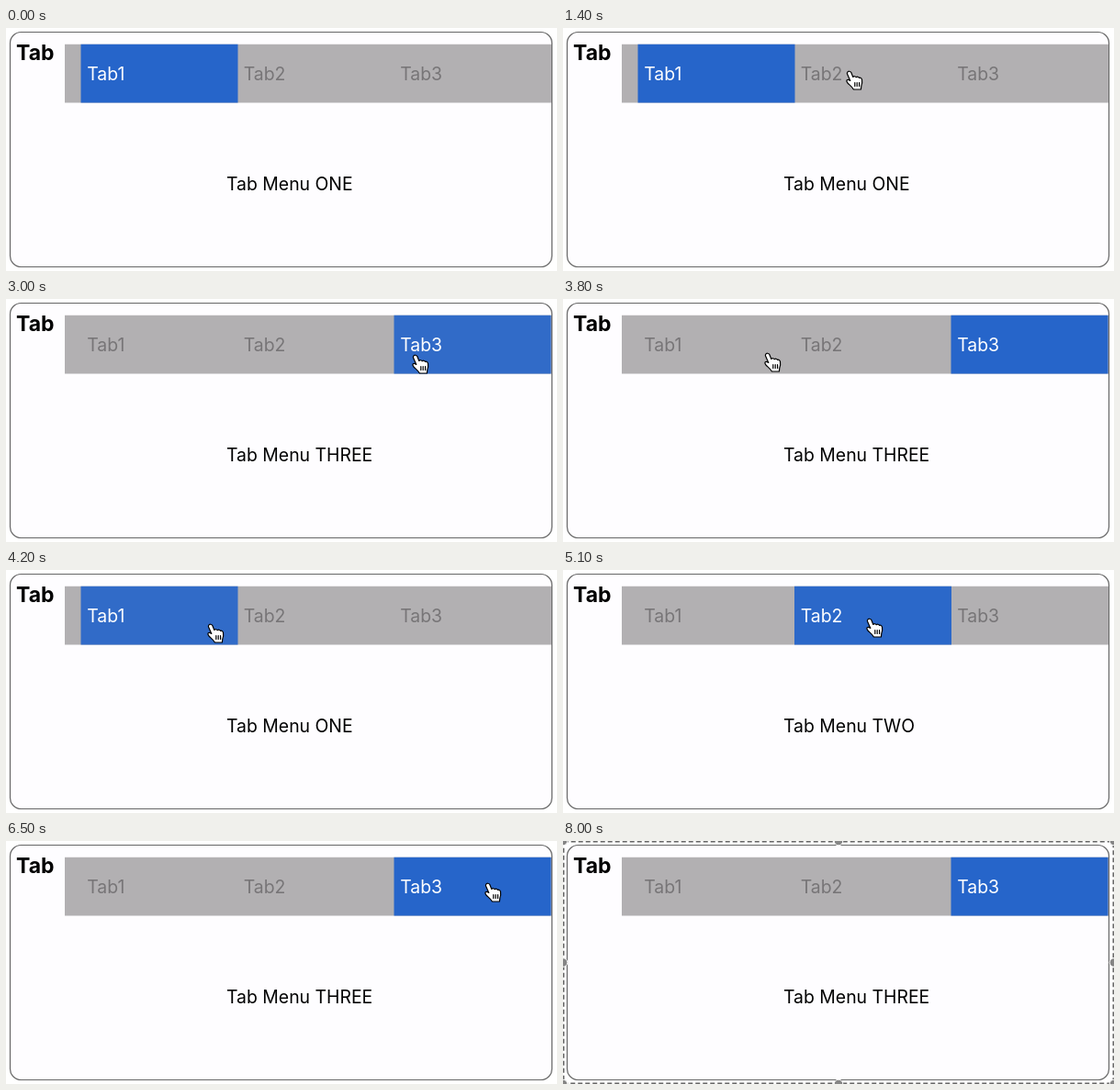
Write an HTML page that moves like this. It is 600 px wide and 265 px high and loops after 9900 ms.

```html
<!DOCTYPE html>
<html lang="en">
<head>
<meta charset="utf-8">
<title>Tab menu</title>
<style>
  html, body { margin: 0; width: 100%; height: 100%; overflow: hidden; background: #fff; }
  svg { display: block; width: 100%; height: 100%; }
  text { font: 19.4px Inter, "Open Sans", sans-serif; }
  .title { font-size: 23px; font-weight: 700; }
  .frame { fill: #fefdff; stroke: #666; stroke-width: 1.2; }
  .dashes { fill: none; stroke: #666; stroke-width: 1.5; stroke-dasharray: 5 3; }
  .handles { fill: #858585; stroke: #fff; }
  #hand { fill: #fff; stroke: #000; stroke-width: 1.2; stroke-linejoin: round; stroke-linecap: round; }
  #arrow { fill: #000; stroke: #fff; stroke-width: 1.2; stroke-linejoin: round; }
</style>
</head>
<body>
<svg viewBox="0 0 600 265">
  <clipPath id="bar"><rect x="64" y="17.7" width="530" height="63.8"/></clipPath>
  <rect class="frame" x="4.5" y="4.5" width="590" height="256" rx="12"/>
  <text class="title" x="11" y="34.5">Tab</text>
  <g clip-path="url(#bar)">
    <rect x="60" y="10" width="540" height="80" fill="#b2b0b2"/>
    <rect id="highlight" y="10" width="171" height="80"/>
  </g>
  <g id="labels"></g>
  <text id="content" x="240" y="177"></text>
  <g id="cursor">
    <g id="hand">
      <path d="M1.6 2.4C2.4.8 5 .8 5.8 2.6L7.8 7.4C8.6 6.4 10.6 6.5 11.2 7.7C12.2 6.8 13.9 7.1 14.4 8.4C15.6 7.8 17.2 8.6 17.5 10.2C18 13.4 17.8 15.2 16.8 17.2L16.4 21H8.4C7.4 18.8 5 16.8 3.2 15.2C1 13.2.4 11.6 1.3 10.7C2.3 9.8 3.6 10.6 4.8 11.4L1.7 4.6C1.3 3.7 1.3 3 1.6 2.4Z"/>
      <path d="M9.8 13.5v4M12.2 13.5v4M14.6 13.5v4"/>
    </g>
    <path id="arrow" d="M1 1V17.5L4.8 14L7.4 20.5L10.2 19.3L7.7 13H13Z"/>
  </g>
  <g id="selection">
    <rect class="dashes" x=".75" y=".75" width="598.5" height="263.5"/>
    <g class="handles"></g>
  </g>
</svg>
<script>
  const LOOP = 9900, STEP = 100, FADE = 530, TRAVEL = 350, CLICK_DELAY = 150;
  const POINTER_IN = 200, SELECT = 8000;
  const GRAY = [178, 176, 178], BLUE = [38, 101, 202];
  const WORDS = ['ONE', 'TWO', 'THREE'];

  // Where the pointer rests; a stop with a tab ends in a click.
  const stops = [
    { arrive: POINTER_IN, x: 446, y: 225 },
    { arrive: 300, x: 450, y: 220 },
    { arrive: 1100, x: 91, y: 50 },
    { arrive: 1400, x: 308, y: 46, tab: 1 },
    { arrive: 2500, x: 442, y: 60, tab: 2 },
    { arrive: 3700, x: 219, y: 58, tab: 0 },
    { arrive: 4550, x: 330, y: 52, tab: 1 },
    { arrive: 5750, x: 521, y: 45, tab: 2 }
  ];
  const clicks = [{ at: -FADE, tab: 0 }];
  for (const { arrive, tab } of stops)
    if (tab !== undefined) clicks.push({ at: arrive + CLICK_DELAY, tab });

  const $ = s => document.querySelector(s);
  const mix = (a, b, k) => a + (b - a) * k;
  const tabLeft = i => 81.5 + i * 170.5;
  const show = (el, on) => el.setAttribute('visibility', on ? 'visible' : 'hidden');

  function add(parent, tag, attrs) {
    const el = document.createElementNS('http://www.w3.org/2000/svg', tag);
    for (const name in attrs) el.setAttribute(name, attrs[name]);
    return parent.appendChild(el);
  }

  const labels = WORDS.map((_, i) => {
    const label = add($('#labels'), 'text', { x: tabLeft(i) + 6.7, y: 57.3 });
    label.textContent = 'Tab' + (i + 1);
    return label;
  });

  for (const cx of [0, 300, 600])
    for (const cy of [0, 132.5, 265])
      if (cx !== 300 || cy !== 132.5) add($('.handles'), 'circle', { cx, cy, r: 4.8 });

  // CSS "ease", solved by bisection
  function ease(x) {
    if (x >= 1) return 1;
    const bezier = (p, q, u) => 3 * p * u * (1 - u) ** 2 + 3 * q * u * u * (1 - u) + u ** 3;
    let low = 0, high = 1;
    for (let i = 0; i < 20; i++) {
      const mid = (low + high) / 2;
      if (bezier(.25, .25, mid) < x) low = mid; else high = mid;
    }
    return bezier(.1, 1, low);
  }

  function pointerAt(t) {
    let { x, y, arrive: last } = stops[0];
    for (const stop of stops.slice(1)) {
      const travel = Math.min(TRAVEL, stop.arrive - last);
      const k = Math.min(1, Math.max(0, 1 - (stop.arrive - t) / travel));
      const smooth = k * k * (3 - 2 * k);
      x = mix(x, stop.x, smooth);
      y = mix(y, stop.y, smooth);
      last = stop.arrive;
    }
    return { x, y };
  }

  function draw(t) {
    const { at, tab } = clicks.filter(c => c.at <= t).pop();
    const level = ease((t - at) / FADE);
    const color = GRAY.map((c, n) => Math.round(mix(c, BLUE[n], level)));
    $('#highlight').setAttribute('x', tabLeft(tab));
    $('#highlight').setAttribute('fill', `rgb(${color})`);
    labels.forEach((label, i) => label.setAttribute('fill', i === tab ? '#fff' : '#777577'));
    $('#content').textContent = 'Tab Menu ' + WORDS[tab];

    const { x, y } = pointerAt(t);
    const visible = t >= POINTER_IN && t < SELECT;
    const onBar = y < 80;
    show($('#hand'), visible && onBar);
    show($('#arrow'), visible && !onBar);
    $('#cursor').setAttribute('transform', `translate(${x} ${y})`);
    show($('#selection'), t >= SELECT);
  }

  const origin = performance.now();
  function tick() {
    const t = Math.max(0, performance.now() - origin) % LOOP;
    draw(Math.floor(t / STEP) * STEP);
    requestAnimationFrame(tick);
  }
  tick();
</script>
</body>
</html>
```
